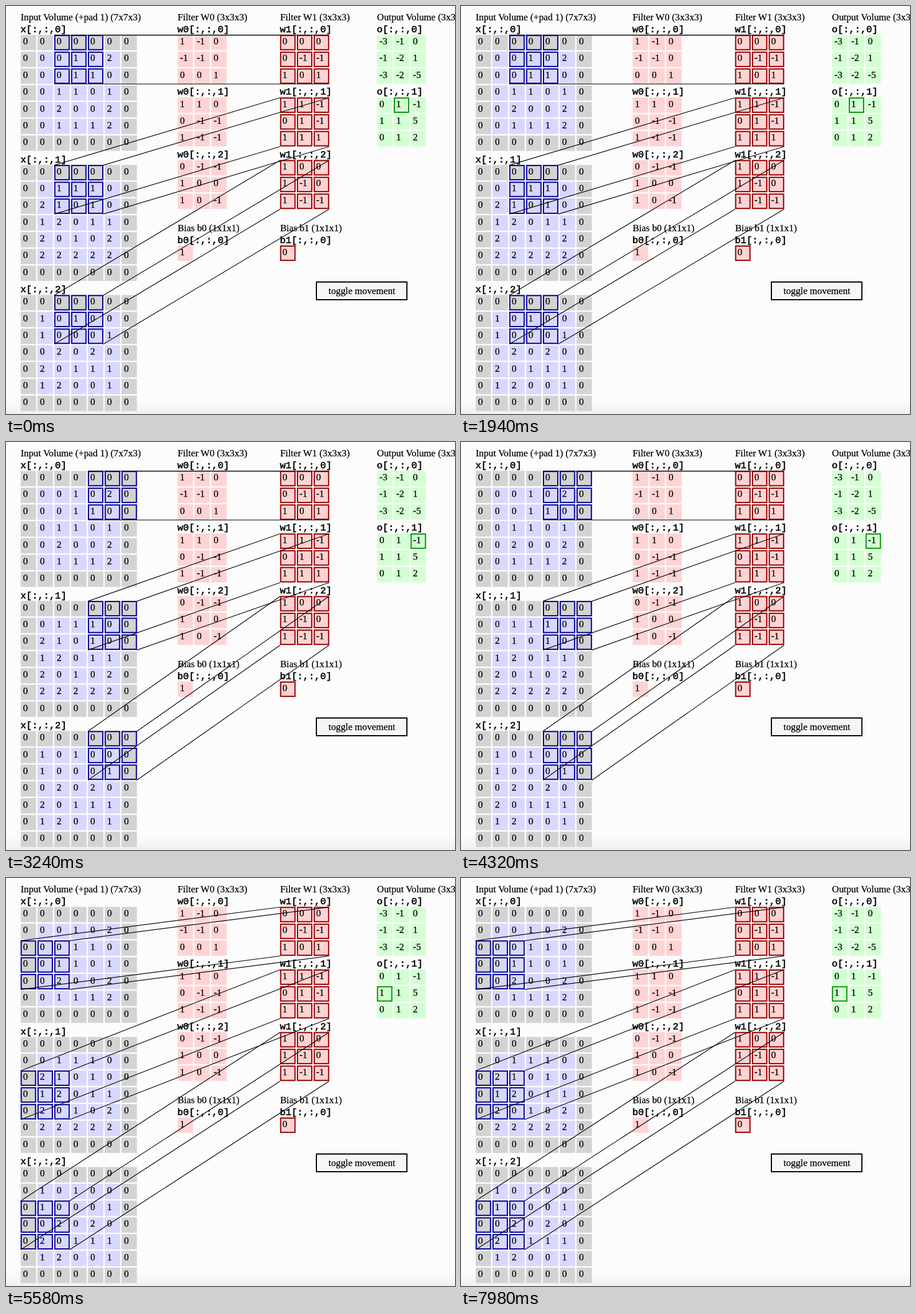
Recreate the animation shown at these times as an HTML page. Size 784 by 714 pixels, loop 8000 ms.

```html
<!DOCTYPE html>
<html lang="en">
<head>
<meta charset="utf-8">
<title>Convolution demo</title>
<style>
  html, body { margin: 0; width: 100%; height: 100%; overflow: hidden; background: #fcfcfc; }
  svg { display: block; width: 784px; height: 714px; }
  text {
    font: 16.75px "Liberation Serif", "Times New Roman", serif;
    fill: #000; stroke: #000; stroke-width: .25; white-space: pre;
  }
  .name { font: 16.75px "Liberation Mono", "Courier New", monospace; stroke-width: .55; }
  .frame { fill: none; stroke-width: 2.1; }
  .link { stroke: #000; stroke-width: 1.2; }
  .step { opacity: 0; animation: 8s step-end infinite; }
  #step0 { animation-name: first; }
  #step1 { animation-name: second; }
  #step2 { animation-name: third; }
  @keyframes first { 0% { opacity: 1; } 33.5%, 100% { opacity: 0; } }
  @keyframes second { 0% { opacity: 0; } 33.5% { opacity: 1; } 67.5%, 100% { opacity: 0; } }
  @keyframes third { 0% { opacity: 0; } 67.5%, 100% { opacity: 1; } }
</style>
</head>
<body>
<svg id="stage" viewBox="0 0 784 714">
  <defs>
    <linearGradient id="shade" x1="0" y1="0" x2="0" y2="1">
      <stop offset="0" stop-color="#fcfcfc"/>
      <stop offset="1" stop-color="#f0f0f0"/>
    </linearGradient>
  </defs>
  <rect width="784" height="714" fill="#fcfcfc"/>
  <rect y="690" width="784" height="24" fill="url(#shade)"/>
</svg>
<script>
const PITCH = 29.35, CELL = 26.8, TOP = 50.6;
const INPUT_X = 25.7, W0_X = 299.7, W1_X = 478.7, OUT_X = 647.8;
const INPUT_STEP = 227.6, FILTER_STEP = 109.5, BIAS_TOP = 419.2;
const GREY = '#d3d3d3', BLUE = '#d7d7ff', RED = '#ffd3d3', GREEN = '#d3ffd3';
const stage = document.getElementById('stage');

function add(parent, tag, attrs, content = '') {
  const node = document.createElementNS('http://www.w3.org/2000/svg', tag);
  for (const key in attrs) node.setAttribute(key, attrs[key]);
  node.textContent = content;
  return parent.appendChild(node);
}

const label = (x, y, content, cls = '') => add(stage, 'text', { x, y, class: cls }, content);

function grid(x, top, name, values, cols, colorAt) {
  label(x - .4, top - 4.7, name, 'name');
  values.forEach((value, i) => {
    const col = i % cols, row = Math.floor(i / cols);
    const left = x + col * PITCH, y = top + row * PITCH;
    add(stage, 'rect', { x: left, y, width: CELL, height: CELL, fill: colorAt(col, row) });
    label(left + 4.1, y + 16.5, value);
  });
}

function frames(parent, x, top, size, stroke) {
  for (let i = 0; i < size * size; i++) {
    add(parent, 'rect', {
      class: 'frame', stroke,
      x: x + (i % size) * PITCH + .9, y: top + Math.floor(i / size) * PITCH + .9,
      width: CELL - 1.8, height: CELL - 1.8
    });
  }
}

// Surround the 5x5 interior with a ring of zeros.
function pad(rows) {
  const inner = rows.split(' ').map(row => `0${row}0`);
  return [...['0000000', ...inner, '0000000'].join('')];
}

const inputs = [
  '00102 00110 01101 02002 01112',
  '01110 21010 12011 20102 22222',
  '10100 10001 02020 20111 12001'
];
const filter0 = ['1 -1 0 -1 -1 0 0 0 1', '1 1 0 0 -1 -1 1 -1 -1', '0 -1 -1 1 0 0 1 0 -1'];
const filter1 = ['0 0 0 0 -1 -1 1 0 1', '1 1 -1 0 1 -1 1 1 1', '1 0 0 1 -1 0 1 -1 -1'];
const outputs = ['-3 -1 0 -1 -2 1 -3 -2 -5', '0 1 -1 1 1 5 0 1 2'];

const inputTop = depth => TOP + depth * INPUT_STEP;
const filterTop = depth => TOP + depth * FILTER_STEP;
const isEdge = n => n === 0 || n === 6;

label(INPUT_X, 25, 'Input Volume (+pad 1) (7x7x3)');
label(W0_X, 25, 'Filter W0 (3x3x3)');
label(W1_X, 25, 'Filter W1 (3x3x3)');
label(OUT_X, 25, 'Output Volume (3x3x2)');
label(W0_X, 393.6, 'Bias b0 (1x1x1)');
label(W1_X, 393.6, 'Bias b1 (1x1x1)');

inputs.forEach((rows, d) => grid(INPUT_X, inputTop(d), `x[:,:,${d}]`, pad(rows), 7,
  (col, row) => isEdge(col) || isEdge(row) ? GREY : BLUE));

[[W0_X, 'w0', filter0, RED], [W1_X, 'w1', filter1, RED], [OUT_X, 'o', outputs, GREEN]]
  .forEach(([x, name, layers, color]) => layers.forEach((values, d) =>
    grid(x, filterTop(d), `${name}[:,:,${d}]`, values.split(' '), 3, () => color)));

grid(W0_X, BIAS_TOP, 'b0[:,:,0]', ['1'], 1, () => RED);
grid(W1_X, BIAS_TOP, 'b1[:,:,0]', ['0'], 1, () => RED);

inputs.forEach((_, d) => frames(stage, W1_X, filterTop(d), 3, '#990000'));
frames(stage, W1_X, BIAS_TOP, 1, '#990000');

add(stage, 'rect', {
  x: 542, y: 483, width: 158, height: 31, fill: '#f6f6f4', stroke: '#000', 'stroke-width': 2
});
label(563, 504, 'toggle movement');

// Each step visits one output cell; the input window moves with stride 2.
[[1, 0], [2, 0], [0, 1]].forEach(([col, row], i) => {
  const step = add(stage, 'g', { class: 'step', id: `step${i}` });
  const span = 2 * PITCH + CELL;
  const left = INPUT_X + 2 * col * PITCH;
  frames(step, OUT_X + col * PITCH, filterTop(1) + row * PITCH, 1, '#009900');
  inputs.forEach((_, d) => {
    const top = inputTop(d) + 2 * row * PITCH;
    frames(step, left, top, 3, '#000099');
    for (const dx of [0, span]) for (const dy of [0, span]) {
      add(step, 'line', {
        class: 'link',
        x1: left + dx, y1: top + dy + .4,
        x2: W1_X + dx, y2: filterTop(d) + dy + .4
      });
    }
  });
});
</script>
</body>
</html>
```
